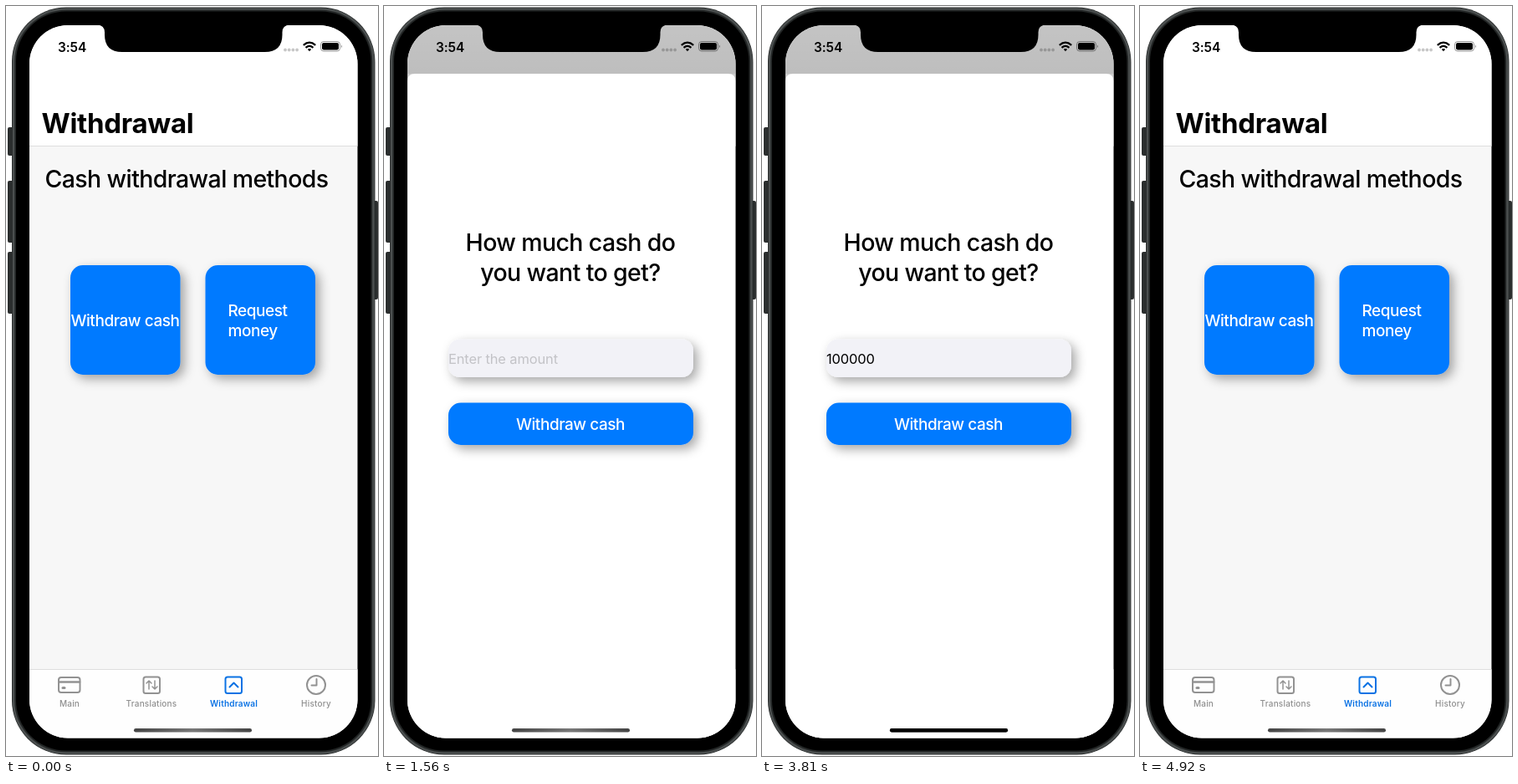
Write an HTML page that moves like this. It is 445 px wide and 897 px high and loops after 4.95 s.

```html
<!DOCTYPE html>
<html lang="en">
<head>
<meta charset="utf-8">
<title>Cash withdrawal</title>
<style>
  html, body { margin: 0; width: 100%; height: 100%; overflow: hidden; background: #fff; }
  svg { display: block; width: 100vw; height: 100vh; font-family: Inter, Roboto, sans-serif; }
  .title { font-size: 33px; font-weight: 700; letter-spacing: -.3px; }
  .heading { font-size: 28.5px; font-weight: 500; letter-spacing: -.62px; }
  .label { font-size: 19px; font-weight: 500; letter-spacing: -.45px; fill: #fff; }
  .input { font-size: 16.5px; letter-spacing: -.15px; }
  .clock { font-size: 15.5px; font-weight: 600; letter-spacing: -.1px; }
  .tab { font-size: 10px; font-weight: 500; letter-spacing: .2px; text-anchor: middle; fill: #8e8e8e; }
  .tab.active { font-weight: 600; fill: #0a72e4; }
  .icon { fill: none; stroke: #929292; stroke-width: 2; stroke-linecap: round; stroke-linejoin: round; }
  .icon.active { stroke: #0a72e4; }
  .middle { text-anchor: middle; }
</style>
</head>
<body>
<svg viewBox="0 0 445 897" preserveAspectRatio="none">
  <defs>
    <clipPath id="screen"><rect x="28" y="23" width="392.5" height="852.5" rx="46"/></clipPath>
    <filter id="shadow" x="-25%" y="-80%" width="150%" height="260%">
      <feDropShadow dx="5" dy="5" stdDeviation="6.5" flood-color="#000" flood-opacity=".35"/>
    </filter>
    <linearGradient id="sheetShade" x1="0" y1="0" x2="0" y2="1">
      <stop offset="0" stop-color="#000" stop-opacity="0"/>
      <stop offset="1" stop-color="#000" stop-opacity=".07"/>
    </linearGradient>
    <linearGradient id="barFill">
      <stop offset="0" stop-color="#444"/>
      <stop offset=".5" stop-color="#777"/>
      <stop offset="1" stop-color="#444"/>
    </linearGradient>
  </defs>

  <!-- phone body -->
  <g fill="#2b2e2e">
    <rect x="2" y="145" width="8" height="34" rx="2"/>
    <rect x="2" y="209" width="8" height="74" rx="2"/>
    <rect x="2" y="294" width="8" height="74" rx="2"/>
    <rect x="437" y="233" width="8" height="118" rx="2"/>
  </g>
  <rect x="7" y="1.5" width="434.5" height="894" rx="65" fill="#232626"/>
  <rect x="9" y="3.5" width="430.5" height="890" rx="63" fill="none" stroke="#4b4f4f" stroke-width="2.5"/>
  <rect x="12" y="6.5" width="424.5" height="884" rx="60"/>

  <g clip-path="url(#screen)">
    <!-- main page -->
    <rect x="28" y="23" width="393" height="853" fill="#f7f7f7"/>
    <rect x="28" y="23" width="393" height="144" fill="#fff"/>
    <path d="M28 167.5h393M28 793.5h393" stroke="#dedede"/>
    <text class="title" x="42.5" y="152">Withdrawal</text>
    <text class="heading" x="46.5" y="217">Cash withdrawal methods</text>
    <g fill="#067aff" filter="url(#shadow)">
      <rect x="77" y="310" width="131.5" height="131" rx="15"/>
      <rect x="238.5" y="310" width="131.5" height="131" rx="15"/>
    </g>
    <text class="label middle" x="142.5" y="383">Withdraw cash</text>
    <text class="label" x="265.5" y="371">Request</text>
    <text class="label" x="265.5" y="395">money</text>

    <rect x="28" y="794" width="393" height="82" fill="#fefefe"/>
    <g class="icon">
      <rect x="63" y="803" width="25.5" height="18" rx="3"/>
      <path d="M64 808.5h24" stroke-width="2.5"/>
      <path d="M68 815.5h2" stroke-width="3"/>
      <rect x="164.5" y="802.5" width="19.5" height="19.5" rx="2.5"/>
      <path d="M171 817v-10m-3 3 3-3 3 3M178 807v10m-3-3 3 3 3-3" stroke-width="1.5"/>
      <circle cx="371" cy="812" r="11"/>
      <path d="M371.5 805v7.5h-6"/>
    </g>
    <g class="icon active">
      <rect x="262.5" y="802.5" width="19.5" height="19.5" rx="2.5"/>
      <path d="m267.5 814.5 5-5 5 5"/>
    </g>
    <text class="tab" x="76" y="838">Main</text>
    <text class="tab" x="174" y="838">Translations</text>
    <text class="tab active" x="272.5" y="838">Withdrawal</text>
    <text class="tab" x="371" y="838">History</text>

    <rect id="dim" x="28" y="23" width="393" height="853" fill="#020402" opacity="0"/>

    <!-- sheet, drawn at its open position -->
    <g id="sheet">
      <rect id="shade" x="28" y="-59" width="393" height="140" fill="url(#sheetShade)"/>
      <path d="M28 900V90q0-9 9-9H411.5q9 0 9 9V900z" fill="#fff"/>
      <text class="heading middle" x="223" y="293">How much cash do</text>
      <text class="heading middle" x="223" y="329">you want to get?</text>
      <rect x="77" y="398.5" width="293" height="45.5" rx="14" fill="#f2f2f7" filter="url(#shadow)"/>
      <text id="amount" class="input" x="77" y="427.5"></text>
      <rect id="caret" y="410" width="2" height="22" rx="1" fill="#3f68e0"/>
      <g id="button">
        <rect x="77" y="474.5" width="293" height="50.5" rx="15" fill="#067aff" filter="url(#shadow)"/>
        <text class="label middle" x="223" y="506.5">Withdraw cash</text>
      </g>
    </g>

    <rect x="153" y="864" width="141" height="4.5" rx="2.25" fill="url(#barFill)"/>
    <rect id="darkBar" x="153" y="864" width="141" height="4.5" rx="2.25"/>

    <!-- status bar -->
    <text class="clock" x="62" y="54.5">3:54</text>
    <g fill="#000" fill-opacity=".22">
      <circle cx="334" cy="52.5" r="1.9"/><circle cx="338.7" cy="52.5" r="1.9"/>
      <circle cx="343.4" cy="52.5" r="1.9"/><circle cx="348.1" cy="52.5" r="1.9"/>
    </g>
    <g fill="none" stroke="#000" stroke-width="2.2">
      <path d="M355.8 46.8q7.2-6.2 14.4 0M358.5 49.8q4.5-3.8 9 0"/>
      <path d="m360.8 51.8q2.2-1.6 4.4 0l-2.2 2.4z" fill="#000" stroke="none"/>
    </g>
    <rect x="376.5" y="42.5" width="23" height="11.5" rx="3.5" fill="none" stroke="#000" stroke-opacity=".4"/>
    <rect x="378" y="44" width="20" height="8.5" rx="2.2"/>
    <path d="M401 46.5q2 1.8 0 3.6z" fill-opacity=".45"/>
  </g>

  <path d="M109 22.5q9 .5 9 9v3q0 20.5 21 20.5H309.5q21 0 21-20.5v-3q0-8.5 9-9z"/>
</svg>

<script>
const LOOP = 4950;
const OPEN = { start: 1021, length: 524 };
const CLOSE = { start: 4559, length: 361 };
const KEY_TIMES = [2640, 2820, 3000, 3150, 3300, 3480];
const CARET_OFF = [[1560, 1800], [2100, 2340], [3750, 3960], [4230, LOOP]];
const SHEET_TRAVEL = 795;

const part = Object.fromEntries(
  ["dim", "sheet", "shade", "amount", "caret", "button", "darkBar"]
    .map(id => [id, document.getElementById(id)]));

const clamp = v => Math.min(1, Math.max(0, v));
const ramp = (t, from, to) => clamp((t - from) / (to - from));
const smooth = v => v * v * (3 - 2 * v);

// Critically damped spring, scaled to arrive exactly at the end of its span.
const settle = ms => 1 - (1 + .0126 * ms) * Math.exp(-.0126 * ms);
const spring = (t, { start, length }) =>
  settle(Math.min(length, Math.max(0, t - start))) / settle(length);

function draw(t) {
  const closing = t >= CLOSE.start;
  const open = closing ? 1 - spring(t, CLOSE) : spring(t, OPEN);
  part.sheet.setAttribute("transform", `translate(0 ${SHEET_TRAVEL * (1 - open)})`);
  part.sheet.setAttribute("visibility", open > 0 ? "visible" : "hidden");
  part.shade.setAttribute("opacity", clamp(open * 1.5));
  part.dim.setAttribute("opacity", .2 * open ** (closing ? 1.2 : 1.8));

  const typed = KEY_TIMES.filter(key => t >= key).length;
  part.amount.textContent = typed ? "100000".slice(0, typed) : "Enter the amount";
  part.amount.setAttribute("fill", typed ? "#000" : "#c3c3c7");
  part.caret.setAttribute("x", typed ? 83.8 + 10.2 * (typed - 1) : 77);
  const caretHidden = CARET_OFF.some(([from, to]) => t >= from && t < to);
  part.caret.setAttribute("opacity", caretHidden ? 0 : 1);

  const press = smooth(ramp(t, 4400, 4520)) * (1 - ramp(t, 4530, 4690)) ** 1.2;
  part.button.setAttribute("transform",
    `translate(223.5 499.75) scale(${1 - .05 * press}) translate(-223.5 -499.75)`);

  part.darkBar.setAttribute("opacity", ramp(t, 1740, 2250) * (1 - ramp(t, 4410, 4620)));
}

function tick(now) {
  draw((now - begin) % LOOP);
  requestAnimationFrame(tick);
}

const begin = performance.now();
draw(0);
requestAnimationFrame(now => tick(Math.max(now, begin)));
</script>
</body>
</html>
```
